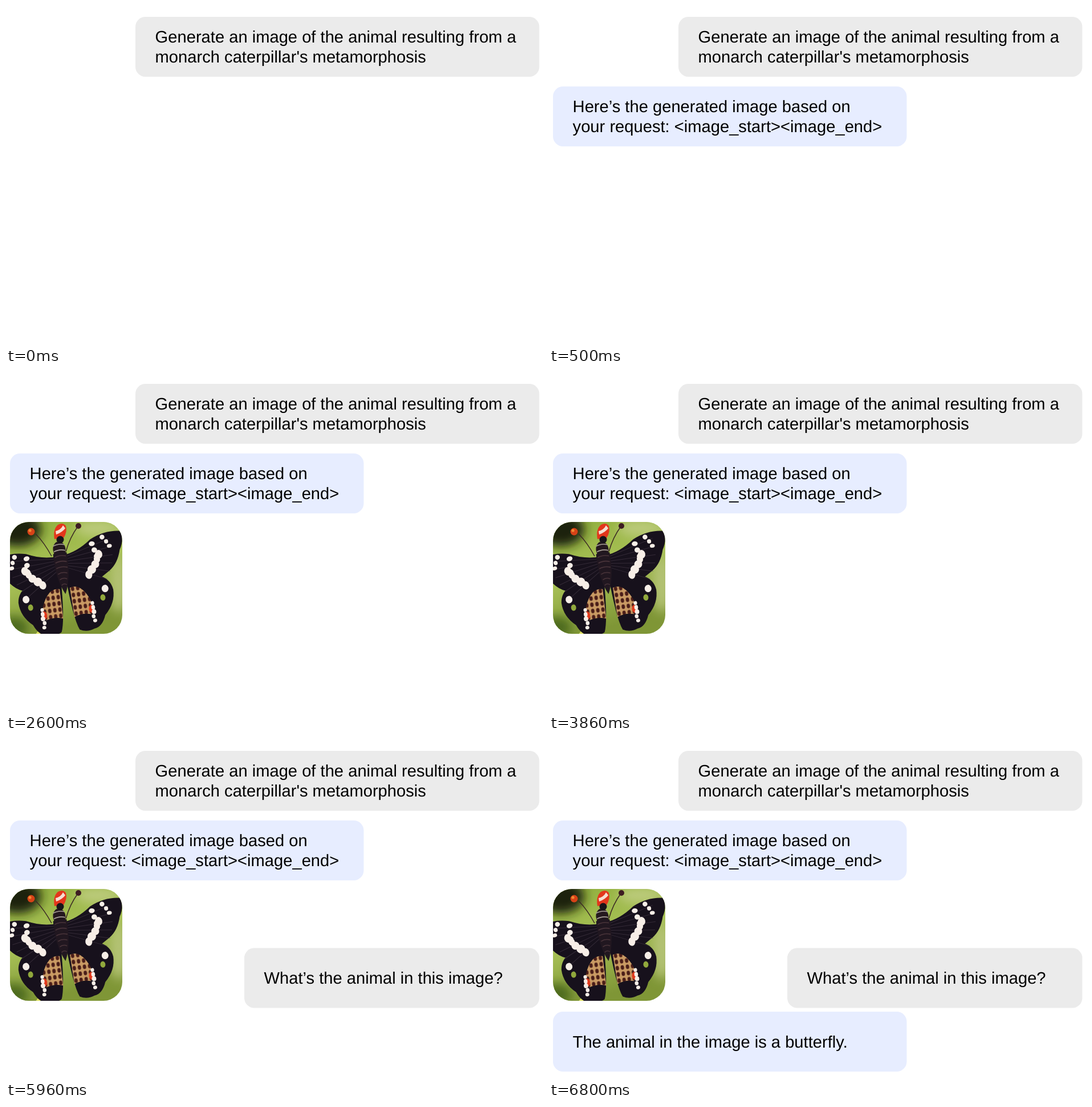
An HTML page for the animation above (8 s loop, 942 px wide and 594 px high).

```html
<!DOCTYPE html>
<html lang="en">
<head>
<meta charset="utf-8">
<title>Chat about a butterfly</title>
<style>
  html, body { margin: 0; width: 100%; height: 100%; overflow: hidden; background: #fff; }
  svg { display: block; width: 942px; height: 594px; }
  text {
    font: 29.15px "Liberation Sans", Arial, sans-serif;
    text-rendering: geometricPrecision;
    fill: #000;
  }
</style>
</head>
<body>
<svg viewBox="0 0 942 594">
  <defs>
    <clipPath id="frame"><rect x="7" y="261" width="197" height="196" rx="33"/></clipPath>
    <filter id="soft" x="-50%" y="-50%" width="200%" height="200%"><feGaussianBlur stdDeviation="9"/></filter>
    <linearGradient id="leaves" x2="0.3" y2="1">
      <stop offset="0" stop-color="#8fae3c"/>
      <stop offset=".5" stop-color="#a9c257"/>
      <stop offset="1" stop-color="#7f9636"/>
    </linearGradient>
    <pattern id="dots" width="9" height="11" patternUnits="userSpaceOnUse">
      <rect width="9" height="11" fill="#c99a63"/>
      <ellipse cx="4.5" cy="5.5" rx="3" ry="3.9" fill="#4a1d18"/>
    </pattern>
    <g id="fore">
      <path d="M4 0Q30 -2 56 -21Q84 -34 112 -28Q114 -10 105 4Q98 28 82 38L62 50L4 40Z" fill="#17111c"/>
    </g>
    <g id="hind">
      <path d="M4 30L66 46Q82 54 84 72Q84 96 64 114Q56 134 42 135Q28 140 16 133Q7 112 4 30Z" fill="#17111c"/>
      <path d="M9 58Q29 52 42 84Q45 98 40 109Q24 104 10 110Z" fill="url(#dots)"/>
      <ellipse cx="70" cy="68" rx="6" ry="6.5" fill="#f7eee7"/>
      <ellipse cx="64" cy="83" rx="4.5" ry="5.5" fill="#91a83c"/>
      <ellipse cx="42" cy="100" rx="5" ry="7" fill="#e13a1d"/>
    </g>
  </defs>
  <g id="chat"></g>
  <g id="photo" clip-path="url(#frame)">
    <rect x="7" y="261" width="197" height="196" fill="url(#leaves)"/>
    <g filter="url(#soft)">
      <ellipse cx="20" cy="274" rx="42" ry="30" fill="#1c2408"/>
      <ellipse cx="160" cy="272" rx="40" ry="14" fill="#bccb7c"/>
      <ellipse cx="198" cy="370" rx="16" ry="50" fill="#b4c274"/>
      <ellipse cx="14" cy="446" rx="26" ry="20" fill="#4d6a1e"/>
    </g>
    <path d="M52 458Q58 446 75 445L82 458Z" fill="#e1e264"/>
    <g transform="translate(95 320) rotate(-8)">
      <use href="#hind"/>
      <use href="#hind" transform="scale(-1 1)"/>
      <use href="#fore"/>
      <use href="#fore" transform="scale(-1 1) rotate(10)"/>
      <ellipse cy="-11" rx="11" ry="14" fill="#25191f"/>
      <path d="M-12 -4Q0 -10 12 -4Q14 40 0 68Q-14 40 -12 -4Z" fill="#211720"/>
      <g id="rings" fill="none" stroke-width="1.6"></g>
    </g>
    <path d="M52 282Q67 297 80 321M105 313Q112 288 126 269" fill="none" stroke="#3b2925" stroke-width="1.5"/>
    <circle cx="44" cy="278" r="6.5" fill="#d74217"/>
    <circle cx="42" cy="276" r="2.5" fill="#f08a32"/>
    <circle cx="127" cy="268" r="5" fill="#3d1c22"/>
    <path d="M85 291Q82 274 91 266Q100 261 105 268Q108 278 101 289Z" fill="#e3361c"/>
    <path d="M87 277Q96 275 100 267L104 272Q99 279 88 283Z" fill="#f6dfd2"/>
    <circle cx="95" cy="292" r="6.5" fill="#18141a"/>
  </g>
</svg>
<script>
const LOOP = 8000, GAP = 2100, LEAD = 1600;
const GRAY = "#ebebeb", BLUE = "#e7edff", CREAM = "#f7eee7";
const $ = id => document.getElementById(id);

let seed = 7;
function random() {
  seed = (seed * 16807) % 2147483647;
  return seed / 2147483647;
}

function add(parent, tag, attrs, text) {
  const node = document.createElementNS("http://www.w3.org/2000/svg", tag);
  for (const key in attrs) node.setAttribute(key, attrs[key]);
  if (text) node.textContent = text;
  parent.append(node);
  return node;
}

function bubble(x, y, width, fill, ...lines) {
  const group = add($("chat"), "g", {});
  add(group, "rect", { x, y, width, height: 105, rx: 17.5, fill });
  const first = y + 62.7 - 17.5 * (lines.length - 1);
  lines.forEach((line, i) => add(group, "text", { x: x + 34.6, y: first + 35 * i }, line));
  return group;
}

// A row of uneven spots between two points.
function spots(id, x0, y0, x1, y1, count, size) {
  for (let i = 0; i < count; i++) {
    const k = i / (count - 1);
    add($(id), "ellipse", {
      cx: x0 + (x1 - x0) * k + (random() - 0.5) * size,
      cy: y0 + (y1 - y0) * k,
      rx: size * (0.8 + 0.4 * random()),
      ry: size * (0.8 + 0.4 * random()),
      fill: CREAM
    });
  }
}

function paintButterfly() {
  for (let i = 0; i < 6; i++) {
    const angle = -0.2 + i * 0.16;
    const d = `M10 ${3 + i * 4}L${92 * Math.cos(angle)} ${92 * Math.sin(angle)}`;
    add($("fore"), "path", { d, stroke: "#514452", opacity: 0.5 });
  }
  spots("fore", 60, -13, 64, 10, 3, 4.5);
  spots("fore", 77, -22, 87, -5, 3, 4);
  spots("fore", 66, 7, 46, 40, 5, 6.5);
  spots("hind", 45, 90, 45, 121, 5, 3.6);
  for (let i = 0; i < 8; i++) {
    const y = -18 + i * 10, w = 10 - Math.max(0, i - 4) * 1.8;
    const stroke = i < 2 ? "#a8a099" : "#49343a";
    add($("rings"), "path", { d: `M${-w} ${y}Q0 ${y - 4} ${w} ${y}`, stroke });
  }
}

paintButterfly();
const steps = [
  bubble(227, 19, 708.5, GRAY, "Generate an image of the animal resulting from a", "monarch caterpillar's metamorphosis"),
  bubble(7, 141, 620.5, BLUE, "Here’s the generated image based on", "your request: <image_start><image_end>"),
  $("photo"),
  bubble(418, 364.5, 517.5, GRAY, "What’s the animal in this image?"),
  bubble(7, 476, 620.5, BLUE, "The animal in the image is a butterfly.")
];

function draw(t) {
  steps.forEach((node, i) => node.style.display = t >= i * GAP - LEAD ? "" : "none");
}

function tick() {
  draw(performance.now() % LOOP);
  requestAnimationFrame(tick);
}
tick();
</script>
</body>
</html>
```
